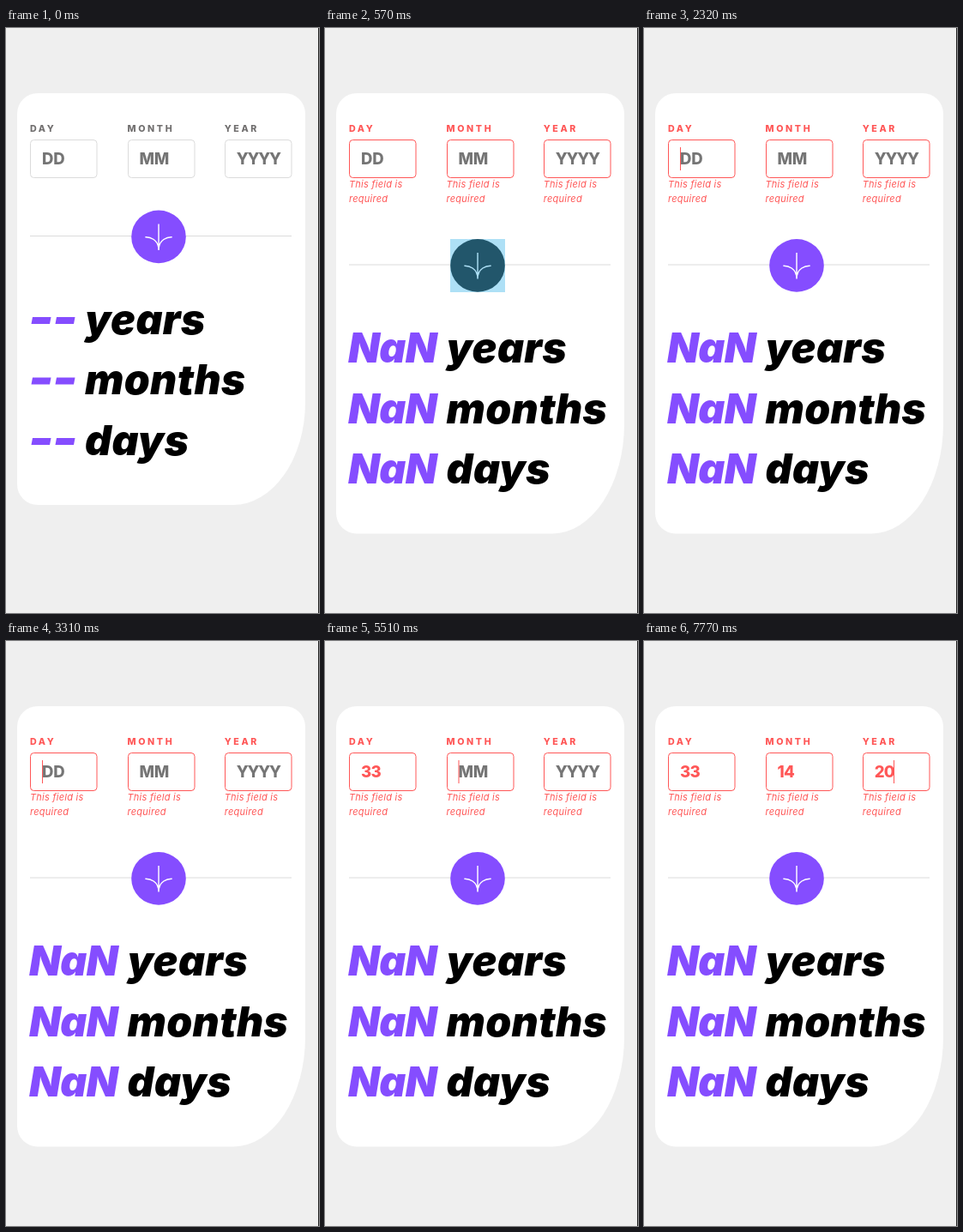
Animation of 365 by 682 pixels, one loop 8 s. Source, as an HTML page:

```html
<!DOCTYPE html>
<html lang="en">
<head>
<meta charset="utf-8">
<title>Age calculator</title>
<style>
  html, body { margin: 0; width: 100%; height: 100%; overflow: hidden; background: #efefef; }
  svg { display: block; width: 365px; height: 682px; font-family: Inter, "Open Sans", sans-serif; --accent: #716f6f; --edge: #dbdbdb; }
  svg.bad { --accent: #ff5757; --edge: #ff5757; }
  .label { font-size: 10.7px; font-weight: 800; letter-spacing: 2.6px; fill: var(--accent); }
  .box { fill: #fff; stroke: var(--edge); }
  .value { font-size: 18.6px; font-weight: 800; letter-spacing: -.8px; fill: #ff5757; }
  .value.empty { fill: #757575; letter-spacing: -.3px; }
  .value.empty.tight { letter-spacing: -1.2px; }
  .error { font-size: 11px; font-style: italic; letter-spacing: .25px; fill: #ff5757; }
  .big { font-size: 48px; font-weight: 900; font-style: italic; letter-spacing: .4px; }
  .violet { fill: #854dff; letter-spacing: -.6px; }
  .disc { fill: #854dff; }
  .arrow { fill: none; stroke: #fff; stroke-width: 2; }
  .halo { fill: #aee0f6; visibility: hidden; }
  .picked .halo { visibility: visible; }
  .picked .disc { fill: #22566b; }
  .picked .arrow { stroke: #aee0f6; }
  svg:not(.bad) .after, svg.bad .before { display: none; }
</style>
</head>
<body>
<svg id="stage" viewBox="0 0 365 682">
  <rect width="365" height="682" fill="#efefef"/>
  <rect x="364" width="1" height="682" fill="#222"/>
  <path id="card" fill="#fff"/>
  <g id="fields"></g>
  <rect id="caret" y="139" width="1" height="27" fill="#ff5757"/>
  <g id="lower">
    <rect x="28" y="242" width="305" height="1" fill="#dbdbdb"/>
    <rect class="halo" x="146" y="212.5" width="64" height="62"/>
    <ellipse class="disc" cx="178" cy="243.4" rx="31.8" ry="30.8"/>
    <path class="arrow" transform="translate(161.7 228.6) scale(.71 .69)"
      d="M1 22C8.3 21.7 23 25.6 23 44V0M45 22C37.7 21.7 23 25.6 23 44"/>
    <g id="results"></g>
  </g>
</svg>
<script>
const $ = id => document.getElementById(id);
const LOOP = 8000, SUBMIT = 570;

const fields = [['DAY', 'DD', 28], ['MONTH', 'MM', 141.5], ['YEAR', 'YYYY', 254.7]];
$('fields').innerHTML = fields.map(([name, hint, x]) => `
  <text class="label" x="${x}" y="121">${name}</text>
  <rect class="box" x="${Math.round(x) + .5}" y="130.5" width="77.5" height="44" rx="4"/>
  <text class="value" x="${x + 14}" y="159"></text>
  <g class="error after"><text x="${x}" y="186">This field is</text><text x="${x}" y="203">required</text></g>`).join('');
const values = document.querySelectorAll('.value');

$('results').innerHTML = ['years', 'months', 'days'].map((unit, i) => `
  <g transform="translate(0 ${356.5 + i * 70.5})">
    <path class="violet before" d="M31-19.5h21.5l-1.5 8h-21.5zM59-19.5h21.5l-1.5 8h-21.5z"/>
    <text class="big before" x="92">${unit}</text>
    <text class="big violet after" x="27">NaN</text>
    <text class="big after" x="141.5">${unit}</text>
  </g>`).join('');

// time, typed values, caret x (0 = hidden)
const steps = [
  [0, ['', '', ''], 0],
  [2320, ['', '', ''], 42], [2780, ['', '', ''], 0],
  [3310, ['', '', ''], 42], [3770, ['', '', ''], 0],
  [4120, ['3', '', ''], 53], [4320, ['33', '', ''], 64],
  [4520, ['33', '', ''], 155.5], [5050, ['33', '', ''], 0], [5510, ['33', '', ''], 155.5],
  [5640, ['33', '1', ''], 163], [5770, ['33', '14', ''], 175],
  [5970, ['33', '14', ''], 268.5], [6450, ['33', '14', ''], 0],
  [6980, ['33', '14', ''], 268.5], [7440, ['33', '14', ''], 0],
  [7640, ['33', '14', '2'], 280], [7770, ['33', '14', '20'], 291]
];

function draw(t) {
  const bad = t >= SUBMIT, drop = bad ? 33.5 : 0, bottom = 556 + drop, curve = (bottom - 76) / 4;
  $('stage').classList.toggle('bad', bad);
  $('stage').classList.toggle('picked', t >= 500 && t < 2320);
  $('lower').setAttribute('transform', `translate(0 ${drop})`);
  $('card').setAttribute('d', `M37 76H325a24 24 0 0 1 24 24V${bottom - curve}
    a84 ${curve} 0 0 1-84 ${curve}H37a24 24 0 0 1-24-24V100a24 24 0 0 1 24-24z`);

  const [, typed, caret] = steps.findLast(step => step[0] <= t);
  values.forEach((node, i) => {
    node.textContent = typed[i] || fields[i][1];
    node.classList.toggle('empty', !typed[i]);
    node.classList.toggle('tight', i === 2);
  });
  $('caret').setAttribute('x', caret);
  $('caret').setAttribute('visibility', caret ? 'visible' : 'hidden');
}

const start = performance.now();
function tick(now) {
  draw(Math.max(0, now - start) % LOOP);
  requestAnimationFrame(tick);
}
draw(0);
requestAnimationFrame(tick);
</script>
</body>
</html>
```
